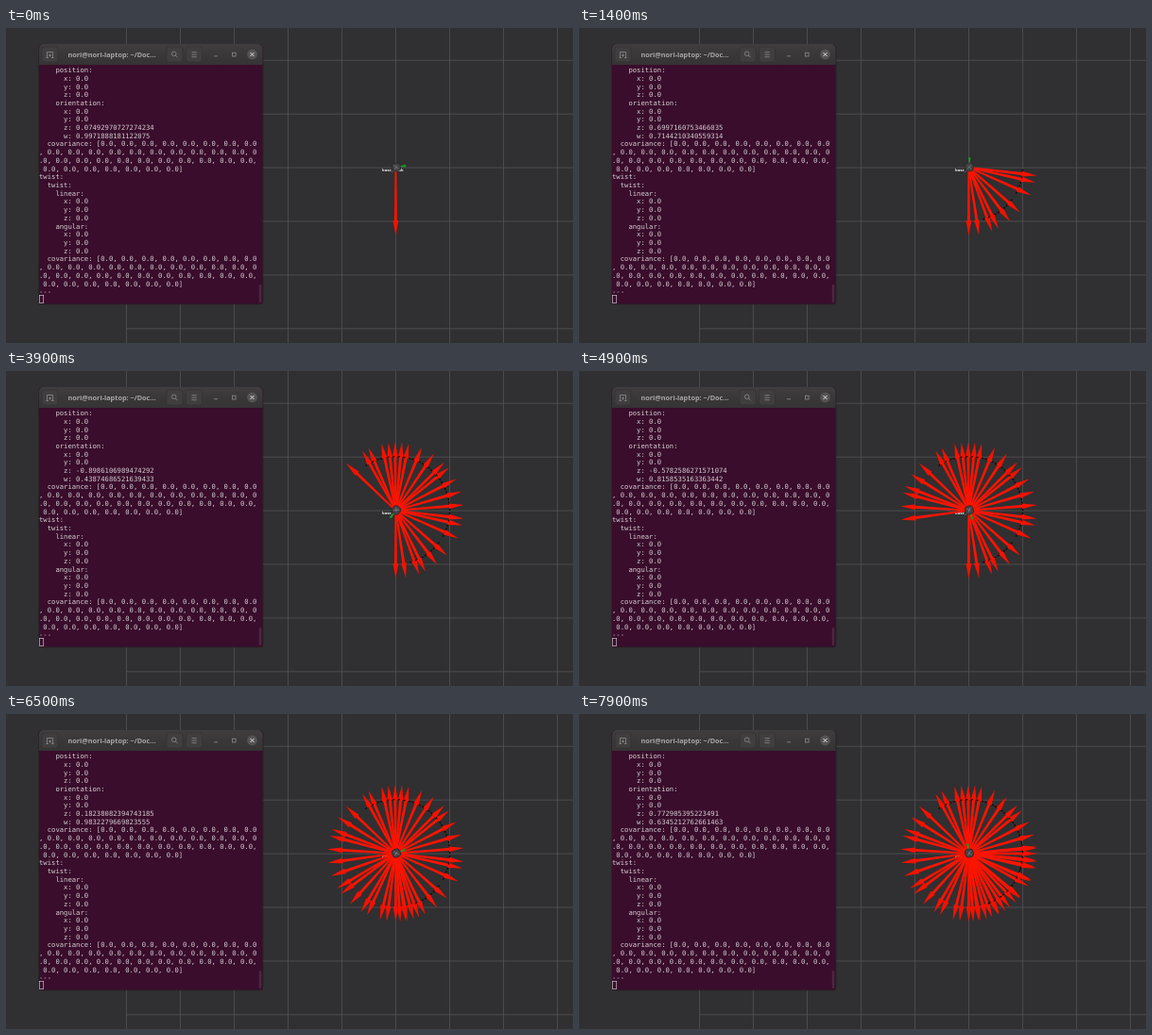
Write an HTML page that moves like this. It is 600 px wide and 334 px high and loops after 8000 ms.

```html
<!DOCTYPE html>
<html lang="en">
<head>
<meta charset="utf-8">
<title>Odometry spin</title>
<style>
  html, body { margin: 0; width: 100%; height: 100%; overflow: hidden; background: #302f31; }
  svg { display: block; width: 600px; height: 334px; }
  .term text { font: 7.22px "DejaVu Sans Mono", monospace; fill: #d6ccd3; white-space: pre; }
  .title { font: bold 7.3px "Noto Sans", "Open Sans", sans-serif; fill: #a9a6a7; text-anchor: middle; }
  .label { font: bold 4.2px "Noto Sans", sans-serif; fill: #f2f2f2; }
  .icon { fill: none; stroke: #8f8c8d; stroke-width: 0.8; }
</style>
</head>
<body>
<svg viewBox="0 0 600 334">
  <defs>
    <linearGradient id="bar" x2="0" y2="1">
      <stop offset="0" stop-color="#403d3f"/>
      <stop offset="1" stop-color="#363335"/>
    </linearGradient>
    <g id="arrow">
      <path d="M-0.9 0H0.9L1.5 58H-1.5Z" fill="#fb1400"/>
      <path d="M-2.9 56.5H2.9L0 72.5Z" fill="#f21200"/>
    </g>
  </defs>
  <g id="grid" stroke="#545355" stroke-width="0.8"></g>

  <g id="labels" class="label">
    <text x="398" y="152.3">base_link</text>
    <text id="sideLabel" x="411" y="152.3">_link</text>
  </g>
  <g id="arrows" transform="translate(412.4 147.8)"></g>
  <g id="robot">
    <path d="M0 0H10" stroke="#1fa62c" stroke-width="1.3"/>
    <circle cx="9" r="1.5" fill="#1c8f2a"/>
    <rect x="-4.3" y="-4.3" width="8.6" height="8.6" rx="3" fill="#434244" stroke="#2a292a" stroke-width="0.8"/>
    <path d="M-2 -2L2 2M-2 2L1 -1" stroke="#7f7c7d" stroke-width="0.8"/>
  </g>

  <rect x="34" y="17" width="238.5" height="276.5" rx="5" fill="#222022" opacity="0.6"/>
  <path d="M35 292.5V22a5 5 0 0 1 5-5H266.5a5 5 0 0 1 5 5V292.5Z" fill="#390d2b"/>
  <path d="M35 39V22a5 5 0 0 1 5-5H266.5a5 5 0 0 1 5 5V39Z" fill="url(#bar)"/>
  <g fill="#413e3f" stroke="#343133" stroke-width="0.7">
    <rect x="38" y="20" width="17" height="16" rx="2.5"/>
    <rect x="170" y="20" width="17" height="16" rx="2.5"/>
    <rect x="190.5" y="20" width="17" height="16" rx="2.5"/>
  </g>
  <g class="icon">
    <path d="M43.5 31.5V25.5H49.5V31.5M42.5 31.5H45M48 31.5H50.5M46.5 27.5V30.5M45 29H48"/>
    <circle cx="177.7" cy="27.3" r="2.3"/>
    <path d="M179.4 29L181.5 31.2M196.5 25.7H201.7M196.5 28.2H201.7M196.5 30.7H201.7"/>
    <path d="M220 29.8H224"/>
    <rect x="239.5" y="26.2" width="3.6" height="3.8"/>
  </g>
  <circle cx="260.5" cy="28" r="5.4" fill="#565354"/>
  <path d="M258.5 26L262.5 30M262.5 26L258.5 30" stroke="#ddd" stroke-width="1"/>
  <text class="title" x="112" y="30.6">nori@nori-laptop: ~/Doc...</text>
  <g id="screen" class="term"></g>
  <rect x="35.5" y="283.5" width="4.2" height="8" fill="none" stroke="#c9c0c6" stroke-width="0.7"/>
  <rect x="267.7" y="272" width="2.6" height="19" rx="1.3" fill="#4b2740"/>
</svg>
<script>
  const NS = "http://www.w3.org/2000/svg";
  const STEP = 100, STEPS = 80, COLUMNS = 53;
  const $ = id => document.getElementById(id);

  function add(parent, tag, attrs) {
    const node = document.createElementNS(NS, tag);
    for (const key in attrs) node.setAttribute(key, attrs[key]);
    return parent.appendChild(node);
  }

  // One-metre floor grid
  for (let i = 0; i < 9; i++) {
    const x = 127.5 + i * 57;
    add($("grid"), "path", { d: `M${x} 0V334` });
  }
  for (let i = 0; i < 6; i++) {
    const y = 34.3 + i * 56.9;
    add($("grid"), "path", { d: `M127.5 ${y}H600` });
  }

  // Terminal text, wrapped at the window width
  const xyz = ["      x: 0.0", "      y: 0.0", "      z: 0.0"];
  const zeros = `  covariance: [${Array(36).fill("0.0").join(", ")}]`;
  const covariance = zeros.match(new RegExp(`.{1,${COLUMNS}}`, "g"));
  const lines = [
    "    position:", ...xyz,
    "    orientation:", ...xyz, "      w: 1.0", ...covariance,
    "twist:", "  twist:", "    linear:", ...xyz,
    "    angular:", ...xyz, ...covariance, "---"
  ];
  const rows = lines.map((line, i) => {
    const row = add($("screen"), "text", { x: 35, y: 47.1 + i * 8.71 });
    row.textContent = line;
    return row;
  });
  const zRow = rows[7], wRow = rows[8];

  // Steps at which the turn since the last arrow was large enough to leave a new one
  const kept = [1, 3, 4, 6, 8, 11, 13, 14, 16, 18, 20, 22, 23, 25, 27, 29, 30, 31, 32, 33,
    35, 36, 39, 41, 43, 44, 46, 48, 50, 52, 53, 55, 57, 58, 60, 61, 63, 64, 65, 67, 68,
    70, 71, 73, 74, 76, 77, 78, 79];

  function addArrow(step, heading) {
    const turn = -heading * 180 / Math.PI;
    const node = add($("arrows"), "g", { transform: `rotate(${turn})` });
    const side = heading % (2 * Math.PI);
    if (side > 0.3 && side < 3.8) {
      add(node, "path", { d: "M-5 57H5", stroke: "#0c0808", "stroke-width": 1.2 });
    }
    add(node, "use", { href: "#arrow" });
    return { step, node };
  }
  const arrows = [addArrow(0, 0), ...kept.map(k => addArrow(k, 0.05 + k / 10))];

  function draw(time) {
    const step = Math.floor(time / STEP) % STEPS;
    const yaw = 0.15 + step / 10;
    const wrapped = yaw - 2 * Math.PI * Math.round(yaw / (2 * Math.PI));
    zRow.textContent = "      z: " + Math.sin(wrapped / 2);
    wRow.textContent = "      w: " + Math.cos(wrapped / 2);
    for (const { step: start, node } of arrows) {
      node.style.display = step >= start ? "" : "none";
    }
    const degrees = -yaw * 180 / Math.PI;
    $("robot").setAttribute("transform", `translate(413 147.5) rotate(${degrees})`);
    $("sideLabel").style.display = step < 5 ? "" : "none";
  }

  const begin = performance.now();
  function tick() {
    draw(performance.now() - begin);
    requestAnimationFrame(tick);
  }
  tick();
</script>
</body>
</html>
```
